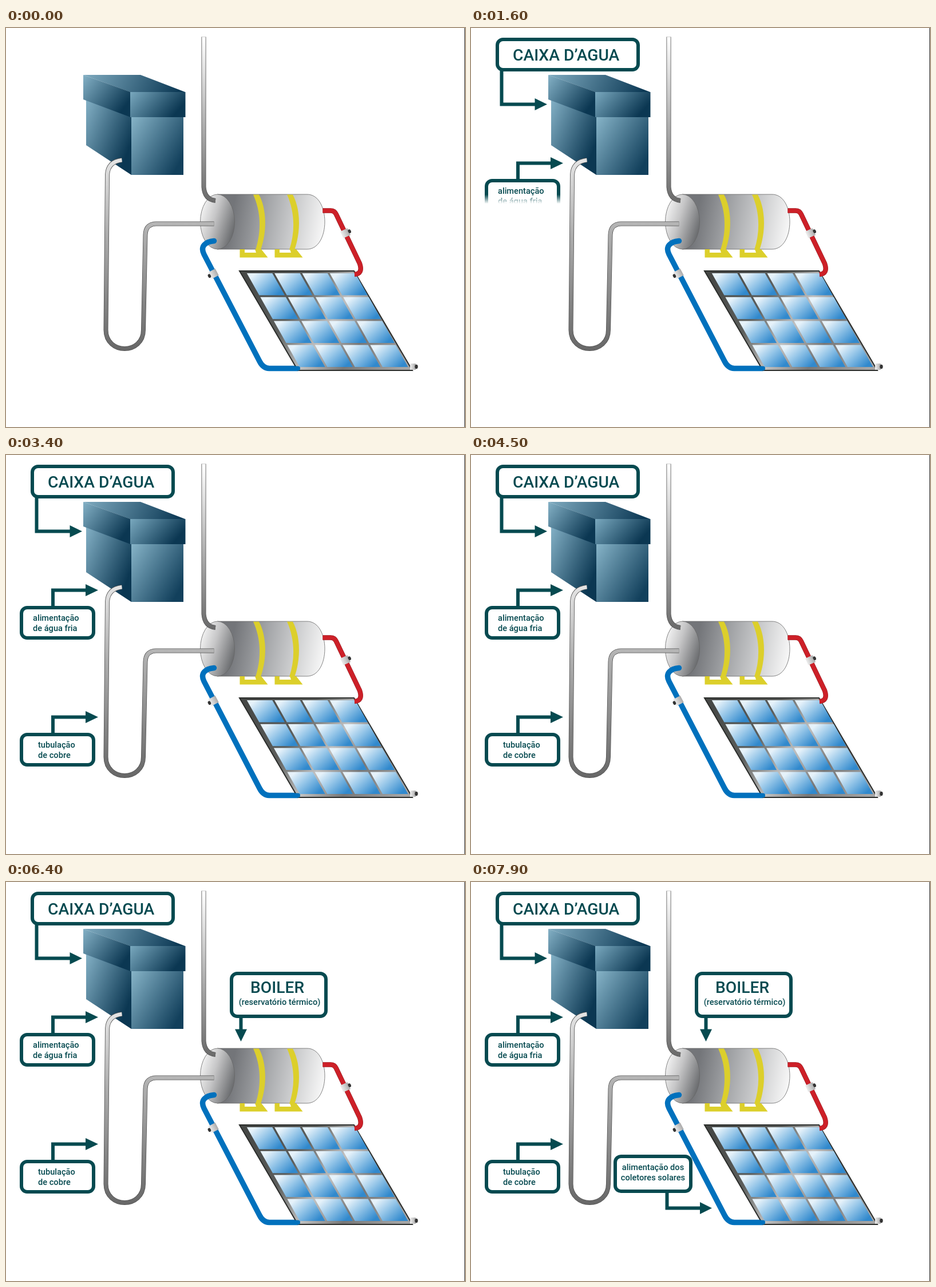
Recreate the animation shown at these times as an HTML page. Size 802x698 px, loop 8000 ms.

```html
<!DOCTYPE html>
<html lang="pt">
<head>
<meta charset="utf-8">
<style>
html, body { margin: 0; width: 100%; height: 100%; overflow: hidden; background: #fff; }
svg { display: block; width: 802px; height: 698px; }
text { font: 500 14.6px Roboto, sans-serif; fill: #064a50; }
.big { font-size: 28.2px; }
.mid { text-anchor: middle; }
.box { fill: #fff; }
.box, .line { stroke: #064a50; stroke-width: 6; }
.line, .pipe { fill: none; }
.head { fill: #064a50; }
.rim { stroke: #666; stroke-width: .8; }
</style>
</head>
<body>
<svg viewBox="0 0 802 698">
  <defs>
    <linearGradient id="top" x2="1" y2=".08"><stop stop-color="#7fabc0"/><stop offset="1" stop-color="#0d3a56"/></linearGradient>
    <linearGradient id="side" x2=".95" y2=".65"><stop stop-color="#84b1c6"/><stop offset="1" stop-color="#0b3752"/></linearGradient>
    <linearGradient id="lid" x2="1" y2=".4"><stop stop-color="#79a8be"/><stop offset="1" stop-color="#0b3752"/></linearGradient>
    <linearGradient id="front" x2="1" y2=".7"><stop stop-color="#8ab7cb"/><stop offset="1" stop-color="#12405c"/></linearGradient>
    <linearGradient id="vent" gradientUnits="userSpaceOnUse" x1="0" x2="0" y1="16" y2="302"><stop stop-color="#fff"/><stop offset=".5" stop-color="#b4b4b4"/><stop offset="1" stop-color="#6c6c6c"/></linearGradient>
    <linearGradient id="cold" gradientUnits="userSpaceOnUse" x1="0" x2="0" y1="230" y2="562"><stop stop-color="#e4e4e4"/><stop offset=".4" stop-color="#acacac"/><stop offset="1" stop-color="#686868"/></linearGradient>
    <linearGradient id="drum" gradientUnits="userSpaceOnUse" x1="395" x2="555" y1="325" y2="355"><stop stop-color="#737579"/><stop offset=".3" stop-color="#9c9ea1"/><stop offset="1" stop-color="#f7f7f7"/></linearGradient>
    <linearGradient id="cap" y1=".25" x2="1" y2=".75"><stop stop-color="#f6f6f6"/><stop offset=".4" stop-color="#c6c6c7"/><stop offset="1" stop-color="#616366"/></linearGradient>
    <linearGradient id="frame" gradientUnits="userSpaceOnUse" x1="430" x2="690" y1="430" y2="600"><stop stop-color="#464846"/><stop offset=".3" stop-color="#5c5e5c"/><stop offset=".52" stop-color="#c0c0c0"/><stop offset=".72" stop-color="#777"/><stop offset="1" stop-color="#a5a5a5"/></linearGradient>
    <linearGradient id="cell" x1=".1" y1=".2" x2=".95" y2=".75"><stop stop-color="#e6f2fa"/><stop offset=".45" stop-color="#94c5e8"/><stop offset="1" stop-color="#3189cd"/></linearGradient>
    <linearGradient id="metal" x2="1"><stop stop-color="#eee"/><stop offset="1" stop-color="#aaa"/></linearGradient>
    <linearGradient id="wipe" x2="0" y2="1"><stop offset=".984" stop-color="#fff"/><stop offset="1"/></linearGradient>
  </defs>

  <!-- water tank -->
  <path fill="url(#side)" d="M140 125L219 150V257L140 205Z"/>
  <path fill="url(#front)" d="M219 150H310V257H219Z"/>
  <path fill="url(#top)" d="M135 82H235L313 112H217Z"/>
  <path fill="url(#side)" d="M135 82L217.500 112V156L135 125Z"/>
  <path fill="url(#lid)" d="M217 112H313.500V156H217Z"/>

  <!-- boiler -->
  <path class="rim" fill="url(#drum)" d="M369 291H526C546 291 557 314 557 339S546 387 526 387H369Z"/>
  <ellipse class="rim" fill="url(#cap)" cx="369.500" cy="339" rx="30" ry="48"/>
  <g id="straps" fill="#dccf2b"></g>

  <!-- pipes -->
  <g id="pipes"></g>
  <path class="pipe" stroke="#0071bd" stroke-width="9.500" stroke-linecap="round" d="M363.500 372.500C348 374 339 382 346 396L443 583Q449 595 460 595.500H510"/>

  <g id="panel"></g>
  <path class="pipe" stroke="#0071bd" stroke-width="8" stroke-linecap="round" d="M470 595.500H510"/>
  <path class="pipe" stroke="#8f1a20" stroke-width="8.600" d="M553.500 319.500H566Q574 319 577 326L618 412Q624 430 609 431"/>
  <path class="pipe" stroke="#cd2028" stroke-width="7.500" d="M553.500 319.500H566Q574 319 577 326L618 412Q624 430 609 431"/>
  <g id="valves"></g>
  <g id="labels"></g>
  <path fill="#333" d="M801 0H802V698H801Z"/>
</svg>
<script>
const $ = id => document.getElementById(id);
const add = (id, html) => $(id).insertAdjacentHTML('beforeend', html);

const strap = (band, foot) => add('straps', `
  <path transform="translate(${band})" d="M432 291.500H442C455 315 457 355 445 388H436C447 355 445 320 432 291.500Z"/>
  <path transform="translate(${foot})" d="M408.500 387H417V393H437L435 387H446L457.500 401.500H408.500Z"/>`);
strap(0, 0);
strap(59, 61);

const pipe = (d, fill) => add('pipes', `<path class="pipe" stroke="#505050" stroke-width="8" d="${d}"/>
  <path class="pipe" stroke="url(#${fill})" stroke-width="6.400" d="${d}"/>`);
pipe('M345.500 15.500V278Q347 300 366 302', 'vent');
pipe('M202.500 231Q177 234 177 259L174.500 528C174.500 572 240 572 240 528L243.500 362Q244 343 262 342.500H363.500', 'cold');

const skew = (u, y) => `${u + .563 * (y - 424)},${y} `;
const slab = (u, y, w, h) => skew(u, y) + skew(u + w, y) + skew(u + w, y + h) + skew(u, y + h);
add('panel', `<path d="M408 425H608L710 599H510Z" fill="url(#frame)" stroke="#2b2d2b" stroke-width="2"/>`);
for (let r = 0; r < 4; r++)
  for (let c = 0; c < 4; c++)
    add('panel', `<polygon fill="url(#cell)" points="${slab(418 + 48.3 * c, 429 + 41.8 * r, 44.5, 38.5)}"/>`);

const valve = (x, y, turn, side) => add('valves', `<g transform="translate(${x} ${y}) rotate(${turn})">
  <rect x="-7" y="-6.500" width="14" height="13" fill="url(#metal)"/>
  <ellipse cx="${side * 8}" rx="2.500" ry="3.500" fill="#333"/></g>`);
valve(593, 359, -25, 1);
valve(362.5, 430, -28, -1);
add('valves', `<rect x="706" y="587" width="10" height="11" fill="url(#metal)"/>
  <ellipse cx="717" cy="592.500" rx="2.700" ry="3.700" fill="#333"/>`);

const WIPE = 500, FEATHER = 8;
const labels = [];
function label(start, top, bottom, [x, y, w, h], line, head, text) {
  const id = 'm' + labels.length;
  add('labels', `<mask id="${id}" maskUnits="userSpaceOnUse" x="0" y="0" width="802" height="698">
    <rect y="-1000" width="802" height="1000" fill="url(#wipe)"/></mask>
    <g mask="url(#${id})"><path class="line" d="${line}"/><path class="head" d="${head}"/>
    <rect class="box" x="${x}" y="${y}" width="${w}" height="${h}" rx="10"/>${text}</g>`);
  labels.push({ start, top, bottom, edge: $(id).firstElementChild });
}
const sideLabel = (start, y, a, b, x) => label(start, y, y + 97, [27, y + 41, 126, 53],
  `M82 ${y + 41}V${y + 10.5}H141`, `M139 ${y}L161 ${y + 10.5}L139 ${y + 21}Z`,
  `<text x="${x}" y="${y + 64}">${a}</text><text x="${x}" y="${y + 81.5}">${b}</text>`);

label(120, 17, 145, [46, 20, 246, 53], 'M53.500 73V133.500H113', 'M111.500 123L133 133.500L111.500 144Z',
  '<text class="big" x="73" y="57">CAIXA D’AGUA</text>');
sideLabel(1240, 226, 'alimentação', 'de água fria', 47);
sideLabel(2305, 448, 'tubulação', 'de cobre', 56);
label(5800, 157, 279, [394, 160, 165, 75], 'M410.500 235V259', 'M400 257.500H421L410.500 279Z',
  '<text class="big mid" x="474" y="194">BOILER</text><text class="mid" x="478" y="215">(reservatório térmico)</text>');
label(7080, 477, 581, [252, 480, 132, 61], 'M342.500 541V570.500H402', 'M400 560L421 570.500L400 581Z',
  '<text class="mid" x="318" y="504">alimentação dos</text><text class="mid" x="318" y="521.500">coletores solares</text>');

function draw(now) {
  const t = Math.floor(now % 8000 / 100) * 100;
  for (const { start, top, bottom, edge } of labels) {
    const p = Math.min(1, Math.max(0, (t - start) / WIPE));
    const y = top + p * (bottom - top + 2 * FEATHER);
    edge.setAttribute('transform', `translate(0 ${y})`);
  }
  requestAnimationFrame(draw);
}
draw(0);
</script>
</body>
</html>
```
